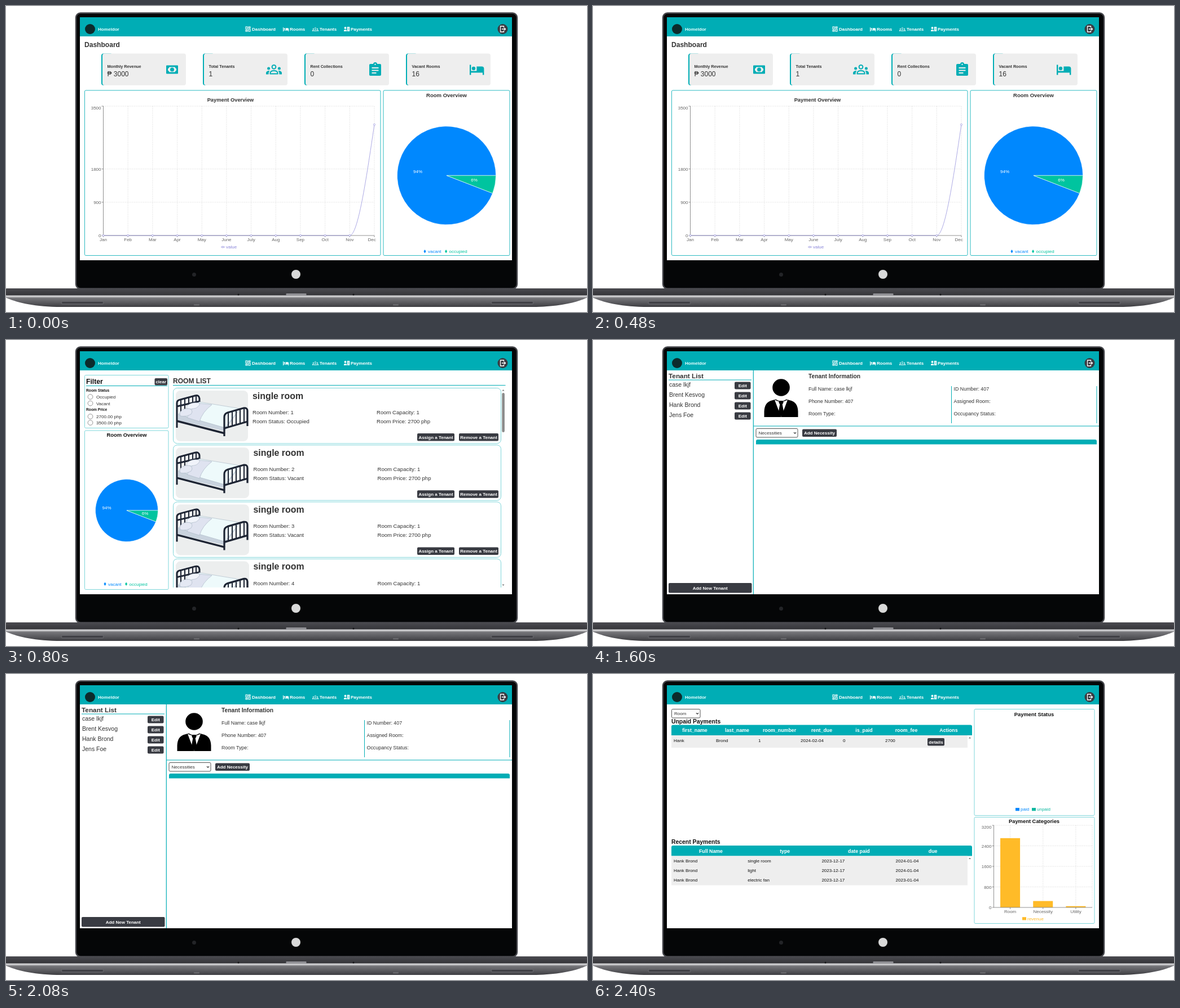
Animation, 1030 px wide and 544 px high, one loop 3200 ms. Source, as an HTML page:

```html
<!DOCTYPE html>
<html lang="en">
<head>
<meta charset="utf-8">
<title>Room rental dashboard</title>
<style>
html, body { margin: 0; width: 100%; height: 100%; overflow: hidden; background: #fff; }
svg { display: block; width: 1030px; height: 544px; }
text { font-family: "Liberation Sans", Arial, sans-serif; white-space: pre; }
</style>
</head>
<body>
<svg id="stage" viewBox="0 0 1030 544" xmlns="http://www.w3.org/2000/svg"></svg>
<script>
const TEAL = '#00adb5', DARK = '#393b42', INK = '#333', GRAY = '#eee';
const BLUE = '#0088fe', GREEN = '#00c49f', AMBER = '#ffbb28', PURPLE = '#8884d8';
const HOLD = 800;

// Drawing helpers, each returning SVG markup
const rect = (x, y, w, h, fill, r = 0, stroke = 'none', sw = 1) =>
  `<rect x="${x}" y="${y}" width="${w}" height="${h}" rx="${r}" fill="${fill}" stroke="${stroke}" stroke-width="${sw}"/>`;
const disc = (x, y, r, fill, stroke = 'none', sw = 1) =>
  `<circle cx="${x}" cy="${y}" r="${r}" fill="${fill}" stroke="${stroke}" stroke-width="${sw}"/>`;
const path = (d, fill, stroke = 'none', sw = 1, more = '') =>
  `<path d="${d}" fill="${fill}" stroke="${stroke}" stroke-width="${sw}" ${more}/>`;
const line = (d, stroke = TEAL, sw = 1, more = '') => path(d, 'none', stroke, sw, more);
const text = (x, y, s, size = 8, fill = INK, anchor = 'start', weight = 400) =>
  `<text x="${x}" y="${y}" font-size="${size}" fill="${fill}" text-anchor="${anchor}" font-weight="${weight}">${s}</text>`;
const bold = (x, y, s, size = 8, fill = INK, anchor = 'start') => text(x, y, s, size, fill, anchor, 700);
const mid = (x, y, s, size = 8, fill = INK) => text(x, y, s, size, fill, 'middle');
const title = (x, y, s, size = 9.4, fill = '#111') => bold(x, y, s, size, fill, 'middle');
const group = (x, y, body, scale = 1) => `<g transform="translate(${x} ${y}) scale(${scale})">${body}</g>`;
const each = (list, fn) => list.map(fn).join('');
const range = (n, fn) => each([...Array(n).keys()], fn);

const panel = (x, y, w, h, stroke = '#7fd6da') => rect(x, y, w, h, '#fff', 2, stroke);
const button = (x, y, w, h, s) =>
  rect(x, y, w, h, DARK, 2) + bold(x + w / 2, y + h / 2 + 2.9, s, 8, '#fff', 'middle');
const select = (x, y, w, h, s) => rect(x, y, w, h, '#fff', 2, '#555') +
  text(x + 4.5, y + h / 2 + 3, s, 8.1) +
  line(`M${x + w - 7} ${y + h / 2 - 1}l2 2 2-2`, INK, 1.1);
const arrow = (x, y, dir) => path(`M${x - 2} ${y + dir}h4l-2 ${-2.5 * dir}z`, '#777');
const dashes = 'stroke-dasharray="1.6 1.6"';

// Icons
const bed = fill => path('M0 0h2.4v11h10V3h9q4 0 4 4v11h-2.400v-4H2.400v4H0z', fill) + disc(7, 6.5, 3.2, fill);
const people = fill =>
  line('M14 1.400a3.400 3.400 0 1 1-.01 0zM7.500 17v-2q1-3.500 6.500-3.500t6.500 3.500v2z', fill, 2) +
  each([4.6, 23.4], x => disc(x, 7.5, 2.5, fill)) +
  path('M0 18v-3q1-3.400 6.500-3.400q-2 2-2 6.400zM28 18v-3q-1-3.400-6.500-3.400q2 2 2 6.400z', fill);
const cash = rect(0, 0, 21, 15, TEAL, 1) + path('M3 6q2-1 2.500-3h10q.5 2 2.500 3v3q-2 1-2.500 3h-10q-.5-2-2.500-3z', GRAY) +
  disc(10.5, 7.5, 3.5, TEAL);
const clipboard = rect(0, 3, 21, 21, TEAL, 2) + disc(10.5, 3.5, 3.5, TEAL) + disc(10.5, 3.7, 1.2, GRAY) +
  line('M4.500 10h12M4.500 14.500h12M4.500 19h8', GRAY, 2);
const tiles = each([[0, 0, 3, 4], [5, 0, 3, 2], [0, 6, 3, 2], [5, 4, 3, 4]],
  ([x, y, w, h]) => rect(x, y, w, h, 'none', 0, '#fff', 1.1));
const payer = disc(2.5, 2, 1.9, '#fff') + path('M0 8V6.500q0-1.500 2.500-1.500T5 6.500V8z', '#fff') +
  rect(5.8, 0, 4.4, 8, '#fff', .6) + line('M7 2.200h2M7 4h2M7 5.800h2', TEAL, .7);

function laptop() {
  const vents = each([98, 860], x => rect(x, 525, 75, 5, '#4a4a4f', 2, '#76767b', .7) +
    line(`M${x + 2} 527.500h71`, '#2e2e32', .8));
  return `<defs>
    <linearGradient id="deck" x2="0" y2="1"><stop stop-color="#4b4b50"/><stop offset="1" stop-color="#343438"/></linearGradient>
    <linearGradient id="hull" x2="0" y2="1"><stop stop-color="#dcdcde"/><stop offset=".13" stop-color="#c0c0c3"/>
      <stop offset=".22" stop-color="#77777b"/><stop offset="1" stop-color="#3e3e42"/></linearGradient>
    <clipPath id="view"><rect x="131" y="20" width="766" height="432"/></clipPath>
    <clipPath id="list"><rect x="295" y="84" width="584" height="356"/></clipPath></defs>` +
    rect(124, 12.5, 782, 490, '#050607', 8, '#45464b', 2.5) +
    rect(131, 20, 766, 432, '#fff') +
    disc(333.5, 477.5, 3.5, '#232427') + disc(514, 477, 8, '#d9d9d9') +
    rect(0, 502, 1030, 13, 'url(#deck)', 1) +
    path('M0 514.500H1030V518.500C1014 526 985 534 940 535H90C45 534 16 526 0 518.500z', 'url(#hull)') +
    rect(496.5, 511, 36, 3.5, '#929297', 1) +
    each([412, 616], x => disc(x, 513, 1.5, '#151517')) + vents +
    each([338, 691], x => rect(x - 5, 530, 10, 2.5, '#68686c', 1));
}

function header() {
  return rect(131, 20, 766, 34, TEAL) + disc(149, 41, 9, '#0c2b2c') +
    bold(163, 44, 'Homeldor', 8.1, '#e8ffff') +
    group(425, 37, tiles) + group(491, 38, bed('#fff'), .4) +
    group(543, 37.8, people('#fff'), .39) + group(599, 37, payer) +
    each([[436, 'Dashboard'], [503, 'Rooms'], [556, 'Tenants'], [611, 'Payments']],
      ([x, s]) => bold(x, 44, s, 8.05, '#fff')) +
    disc(880.5, 41, 9, DARK) +
    line('M882.500 38.500v-2.500h-6v10h6v-2.500M879 41h6.500M883.500 39l2 2-2 2', '#fff', 1.3);
}

function pie(x, y, r, share, labels) {
  const a = (1 - share) * 2 * Math.PI, end = `${x + r * Math.cos(a)} ${y + r * Math.sin(a)}`;
  return path(`M${x} ${y}H${x + r}A${r} ${r} 0 1 0 ${end}z`, BLUE, '#fff', .6) +
    path(`M${x} ${y}H${x + r}A${r} ${r} 0 0 1 ${end}z`, GREEN, '#fff', .6) +
    each(labels, ([lx, ly, s]) => mid(lx, ly, s, 8, '#fff'));
}

const pieLegend = (x, y) => each([[0, 'vacant', BLUE], [37.6, 'occupied', GREEN]], ([dx, s, c]) =>
  path(`M${x + dx} ${y - 6}l2 3.200-2 3.200-2-3.200z`, c) + text(x + dx + 5.5, y, s, 8, c));

const legendBox = (x, y, s, c) => rect(x, y - 5.3, 7, 5.3, c) + text(x + 9, y, s, 8, c);

function lineChart() {
  const left = 172.5, right = 653, top = 178, base = 408, step = (right - left) / 11;
  const months = 'Jan Feb Mar Apr May June July Aug Sep Oct Nov Dec'.split(' ');
  const yOf = v => base - v / 3500 * (base - top), px = i => left + i * step;
  const peak = yOf(3000), nov = px(10);
  return each([900, 1800, 3500], v => line(`M${left} ${yOf(v)}H${right}`, '#d4d4d4', .7, dashes)) +
    range(12, i => line(`M${px(i)} ${top}V${base}`, '#d4d4d4', .7, dashes)) +
    line(`M${left} ${top}V${base}H${right}`, '#777', .8) +
    each([0, 900, 1800, 3500], v => line(`M${left - 3} ${yOf(v)}h3`, '#777', .8) +
      text(168.5, yOf(v) + (v > 3000 ? 5.5 : 3), v, 8, '#666', 'end')) +
    each(months, (m, i) => line(`M${px(i)} ${base}v3`, '#777', .8) + mid(i > 10 ? 648.7 : px(i), 418, m, 8, '#666')) +
    line(`M${left} ${base}H${nov}C${nov + step / 3} ${base} ${right - step / 3} ${(peak + base) / 2} ${right} ${peak}`, PURPLE, .7) +
    range(12, i => disc(px(i), i > 10 ? peak : base, 1.6, '#fff', PURPLE, .6)) +
    line('M381 428.500h7', PURPLE, .8) + disc(384.5, 428.5, 1.4, '#fff', PURPLE, .8) +
    text(390, 431, 'value', 8, PURPLE);
}

function dashboard() {
  const cards = [
    ['Monthly Revenue', '₱ 3000', 115, 21, cash],
    ['Total Tenants', '1', 112, 19, people(TEAL)],
    ['Rent Collections', '0', 115, 15.5, clipboard],
    ['Vacant Rooms', '16', 113, 20, bed(TEAL)],
  ];
  return bold(139, 73, 'Dashboard', 12.05) +
    each(cards, ([name, value, dx, dy, icon], i) => group(169 + i * 180, 84.500,
      rect(0, 0, 20, 56.5, TEAL, 4) + rect(2, 0, 148, 56.5, GRAY, 4) +
      bold(10.5, 25.5, name, 7.25) + text(10.5, 40.5, value, 12) + group(dx, dy, icon))) +
    panel(139.5, 150, 524.5, 293.5, '#2bbac1') + panel(669, 150, 224, 293.5, '#2bbac1') +
    title(398, 170, 'Payment Overview', 9.3, INK) + lineChart() +
    title(781, 162, 'Room Overview', 9.5, INK) +
    pie(781, 301.3, 87.5, 16 / 17, [[730, 296.5, '94%'], [830, 312.3, '6%']]) + pieLegend(742.5, 439);
}

function bedPicture(w) {
  const bars = 'M9 16V53M16 14V50M23 12V30M30 10V26M36 9V23';
  const footBars = 'M93 39V65M100 37V63M107 35V61M114 33V59M121 31V56';
  return rect(0, 0, w, 90, '#eceeee', 8) +
    line(bars, '#1d2433', 2) +
    line('M2 66V22Q2 17 8 16L34 9Q41 7 42 14V24M2 28L42 19', '#1d2433', 3) +
    path('M4 43L42 21L113 33L87 72L4 53z', '#c9d3de') +
    path('M4 42L42 20L114 32L87 66z', '#eefafb', '#a5b2c2', .6) +
    path('M38 22L64 25Q47 38 42 55L20 48Q26 34 38 22z', '#dfe3f0', '#a5b2c2', .6) +
    path('M20 27Q28 20 41 22Q45 25 36 31Q27 34 19 32z', '#f0f3fa', '#a5b2c2', .6) +
    path('M7 41Q9 31 24 32Q32 35 27 42Q18 47 8 45z', '#e4e8f3', '#a5b2c2', .6) +
    line('M2 54L87 76', '#1d2433', 3.4) +
    line(footBars, '#1d2433', 2) +
    line('M86 81V47Q86 41 92 39L120 31Q127 30 127 36V63M86 67L127 55', '#1d2433', 3.2);
}

function roomCard(i) {
  const x = i ? 137.5 : 136;
  return group(301, 90 + i * 101.2,
    rect(-4.5, -4.5, 581, 98.5, '#fff', 7, '#7fd6da') + bedPicture(i ? 130 : 128) +
    bold(x, 14.5, 'single room', 15.9) +
    text(x, 42, `Room Number: ${i + 1}`, 9.55) + text(x, 57.5, `Room Status: ${i ? 'Vacant' : 'Occupied'}`, 9.55) +
    text(x + 220, 42, 'Room Capacity: 1', 9.55) + text(x + 220, 57.5, 'Room Price: 2700 php', 9.55) +
    button(428, 76, 66, 13.5, 'Assign a Tenant') + button(502, 76, 70, 13.5, 'Remove a Tenant'));
}

function rooms() {
  return panel(139.5, 62.5, 148.5, 94) + bold(142, 78, 'Filter', 12.2, '#111') +
    button(263.5, 68, 22.5, 12.5, 'clear') + line('M142 81.500H286') +
    bold(142, 91.5, 'Room Status', 6.7, '#111') + bold(142, 126, 'Room Price', 6.7, '#111') +
    each([[101, 'Occupied'], [112.5, 'Vacant'], [136, '2700.00 php'], [147, '3500.00 php']],
      ([y, s]) => disc(149.5, y, 4.4, '#fff', '#777', .8) + text(160, y + 3, s, 8.1)) +
    panel(139.5, 161, 148.5, 282.5) + title(214, 172, 'Room Overview', 9.4) +
    pie(214, 303, 55.5, 16 / 17, [[178.5, 300.5, '94%'], [246.5, 311, '6%']]) + pieLegend(175.5, 436.5) +
    bold(296, 77, 'ROOM LIST', 12.05) + line('M296 80.500H885.500', TEAL, 1.2) +
    `<g clip-path="url(#list)">${range(4, roomCard)}</g>` +
    rect(879.3, 94, 4.6, 70, '#8b8b8b', 2.3) + arrow(881.5, 89.5, 1) + arrow(881.5, 435.5, -1);
}

function tenants() {
  const names = ['case lkjf', 'Brent Kesvog', 'Hank Brond', 'Jens Foe'];
  const field = (x, y, s) => text(x, y, s, 8.9);
  return bold(134, 67.5, 'Tenant List', 11.8) + line('M134 71H281') +
    each(names, (n, i) => text(135, 83 + i * 18, n, 10.5) + button(251, 74.5 + i * 18, 28.5, 13, 'Edit')) +
    button(134, 432, 147.5, 17.5, 'Add New Tenant') +
    line('M284.300 54V452M284 153H897', TEAL, 1.2) +
    disc(333.5, 84.5, 15.3, '#000') +
    path('M303.500 137V127Q304 112 315 108L324 105.500L333.500 110L343 105.500L352 108Q363 112 363.500 127V137z', '#000') +
    path('M322 106.500L333.500 137L345 106.500L333.500 111z', '#fff') +
    path('M330.500 108h6l1.200 3-2 3.500 2.600 14-4.800 8-4.800-8 2.600-14-2-3.500z', '#000') +
    bold(382, 67.5, 'Tenant Information', 10.25) +
    each(['Full Name: case lkjf', 'Phone Number: 407', 'Room Type:'], (s, i) => field(382, 90.3 + i * 22, s)) +
    each(['ID Number: 407', 'Assigned Room:', 'Occupancy Status:'], (s, i) => field(639.5, 90.3 + i * 22, s)) +
    line('M635.500 82V148M893 82V148') +
    select(289, 157.5, 74, 15.5, 'Necessities') + button(371, 158.5, 61, 13.5, 'Add Necessity') +
    path('M289 185.500V180q0-3 3-3H890q3 0 3 3v5.500z', TEAL);
}

function table(y, heads, first, step, cells, rowY) {
  return path(`M139 ${y + 18.5}V${y + 3}q0-3 3-3H669q3 0 3 3v15.500z`, TEAL) +
    each(heads, (s, i) => title(first + i * step, y + 12.5, s, 8.8, '#fff')) +
    rect(139, y + 18.5, 525, cells.length > 1 ? 52 : 22, GRAY) +
    each(cells, (row, r) => each(row, (s, i) => text(143 + i * step, rowY + r * 17.2, s, 8, '#111'))) +
    arrow(668, y + 23, 1);
}

function barChart() {
  const left = 710.5, right = 885, top = 269, base = 415, band = (right - left) / 3;
  const yOf = v => base - v / 3200 * (base - top), cx = i => left + band * (i + .5);
  const bars = [['Room', 2700], ['Necessity', 250], ['Utility', 50]];
  return each([800, 1600, 2400, 3200], v => line(`M${left} ${yOf(v)}H${right}`, '#d4d4d4', .7, dashes)) +
    each([cx(0), cx(1), cx(2), right], x => line(`M${x} ${top}V${base}`, '#d4d4d4', .7, dashes)) +
    each(bars, ([s, v], i) => rect(cx(i) - 17.5, yOf(v), 35, base - yOf(v), AMBER) +
      line(`M${cx(i)} ${base}v3`, '#777', .8) + mid(cx(i), 425, s, 8, '#666')) +
    line(`M${left} ${top}V${base}H${right}`, '#777', .8) +
    each([0, 800, 1600, 2400, 3200], v => line(`M${left - 3} ${yOf(v)}h3`, '#777', .8) +
      text(706.5, yOf(v) + (v > 3000 ? 5.8 : 3), v, 8, '#666', 'end')) +
    legendBox(761, 437.5, 'revenue', AMBER);
}

function payments() {
  const recent = [['single room', '2024'], ['light', '2024'], ['electric fan', '2023']];
  return select(139.5, 62.5, 50.5, 15.5, 'Room') +
    bold(139, 87.5, 'Unpaid Payments', 10.4, '#111') +
    table(90.5, ['first_name', 'last_name', 'room_number', 'rent_due', 'is_paid', 'room_fee', 'Actions'], 180.5, 75,
      [['Hank', 'Brond', '1', '2024-02-04', '0', '2700']], 121) +
    button(593, 114, 30, 13.5, 'details') +
    bold(139, 302.3, 'Recent Payments', 10.4, '#111') +
    table(305, ['Full Name', 'type', 'date paid', 'due'], 209, 131.2,
      recent.map(([kind, year]) => ['Hank Brond', kind, '2023-12-17', `${year}-01-04`]), 335) +
    panel(676, 62.5, 213, 189) + title(782, 75, 'Payment Status') +
    legendBox(749, 243.3, 'paid', BLUE) + legendBox(778, 243.3, 'unpaid', '#0fb8a0') +
    panel(676, 254.5, 213, 189) + title(782, 265, 'Payment Categories') + barChart();
}

const stage = document.getElementById('stage');
stage.innerHTML = laptop() + `<g clip-path="url(#view)">${header()}` +
  each([dashboard, rooms, tenants, payments], page => `<g class="page">${page()}</g>`) + '</g>';
const pages = [...stage.querySelectorAll('.page')];

function draw() {
  const current = Math.floor(performance.now() / HOLD) % pages.length;
  pages.forEach((page, i) => page.style.display = i === current ? '' : 'none');
  requestAnimationFrame(draw);
}
draw();
</script>
</body>
</html>
```
